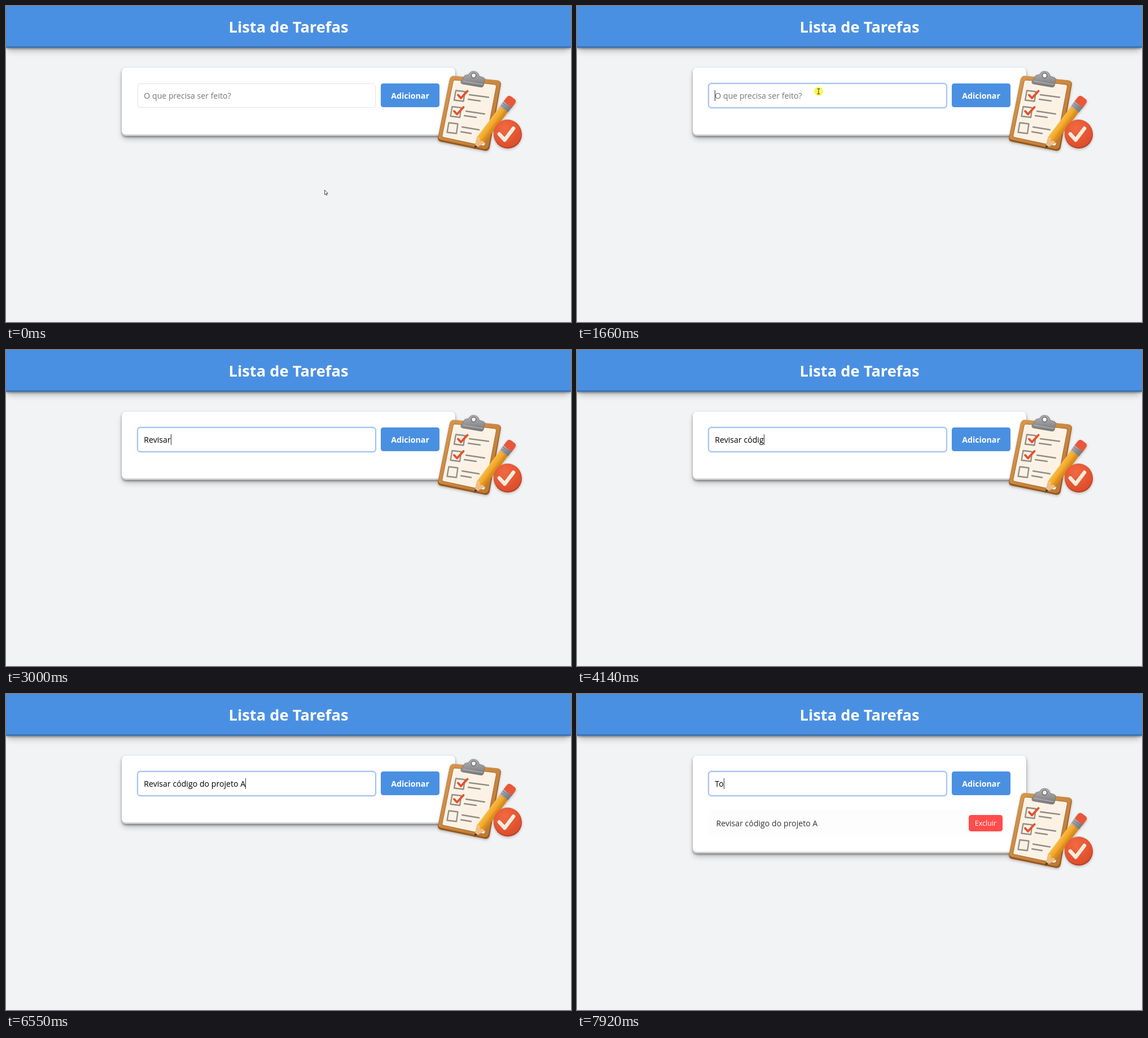
These frames come from a looping animation (1001x559 px, 7.99 s). An HTML page:

```html
<!DOCTYPE html>
<html lang="pt-BR">
<head>
<meta charset="utf-8">
<title>Lista de Tarefas</title>
<style>
html, body { margin: 0; width: 100%; height: 100%; overflow: hidden; background: #f1f3f5; }
body { position: relative; font: 14.15px "Open Sans", "Noto Sans", sans-serif; }
div, svg { position: absolute; box-sizing: border-box; white-space: pre; }
.raised {
  box-shadow: rgba(0,0,0,.4) 0 1.8px 3.6px, rgba(0,0,0,.3) 0 6.3px 11.7px -2.7px,
    rgba(0,0,0,.2) 0 -2.7px 0 inset;
}
#header {
  left: 0; top: 0; width: 1001px; height: 74px; background: #4a90e2; color: #fff;
  font-size: 27.3px; font-weight: 700; line-height: 73px; text-align: center;
}
#card { left: 205px; top: 109px; width: 591px; height: 121px; border-radius: 7px; background: #fff; }
#field {
  left: 233px; top: 136.5px; width: 422px; height: 43px; border: 1px solid #dee2e6;
  border-radius: 5px; padding-left: 10.3px; line-height: 42px; background: #fff;
}
#field.focus { border-color: #8ab6ef; box-shadow: 0 0 0 1.4px rgba(74,144,226,.38); }
#hint { left: 10.3px; top: 0; color: #757575; }
#caret { display: inline-block; width: 1px; height: 19px; background: #333; vertical-align: -4px; }
.button { color: #fff; text-align: center; border-radius: 4.5px; }
#add { left: 664px; top: 137px; width: 104px; height: 42px; background: #4a90e2; font-weight: 700; line-height: 43px; }
#row {
  left: 233px; top: 204px; width: 535px; height: 49px; padding-left: 13.5px;
  border-radius: 5px; background: #fdfdfd; color: #333; line-height: 49px;
}
#del { left: 461px; top: 10px; width: 60px; height: 28.5px; background: #ff4d4d; font-size: 12.5px; line-height: 29px; }
#art, #mouse { left: 0; top: 0; width: 1001px; height: 559px; }
#board { filter: drop-shadow(0 2px 2px rgba(60,40,20,.28)); }
</style>
</head>
<body>
<div id="header" class="raised">Lista de Tarefas</div>
<div id="card" class="raised"></div>
<div id="field"><div id="hint">O que precisa ser feito?</div><span id="typed"></span><span id="caret"></span></div>
<div id="add" class="button">Adicionar</div>
<div id="row">Revisar código do projeto A<div id="del" class="button">Excluir</div></div>

<svg id="art" viewBox="0 0 1001 559" fill="none" stroke-linecap="round" stroke-linejoin="round">
  <defs>
    <linearGradient id="wood" x2="1" y2="1"><stop stop-color="#d99a50"/><stop offset="1" stop-color="#bd7530"/></linearGradient>
    <linearGradient id="steel" x2="0" y2="1"><stop stop-color="#b4b4b5"/><stop offset="1" stop-color="#77777a"/></linearGradient>
    <linearGradient id="paint" x2="0" y2="1"><stop stop-color="#f9bd45"/><stop offset=".45" stop-color="#f2a82b"/><stop offset="1" stop-color="#cf8118"/></linearGradient>
    <radialGradient id="red" cx=".4" cy=".3" r=".75"><stop stop-color="#f06a42"/><stop offset="1" stop-color="#dc4b2a"/></radialGradient>
  </defs>
  <g id="board">
    <path d="M794 124L871 132Q878 133 876.500 140L857 250Q855 257.500 848 256L770 240Q764 238 765.500 232L786 130Q788 123 794 124Z" fill="#97581f"/>
    <path d="M794 123.500L871 131.500Q877 132.500 875.500 139L855 248Q853 254 847 253L770 236.500Q765 235 766.500 230L786.500 129Q788.500 123 794 123.500Z" fill="url(#wood)"/>
    <path d="M797 131L866 139Q869 139.500 868.500 143L849 244Q848 248 844 247L776 232.500Q772 231.500 773 228L792 134Q793 130.500 797 131Z" fill="#fbf2e5" stroke="#a86c33"/>
    <path d="M811 126Q812 122 817 122L820 121A9.500 9.500 0 0 1 838 124L844 126Q849 127 848 131L846 141Q845 144 841 143.500L809 138Q805 137 806 134Z" fill="url(#steel)" stroke="#707073" stroke-width=".8"/>
    <circle cx="828.500" cy="123" r="4.200" fill="#f5f5f5" stroke="#68686b" stroke-width="1.500"/>
    <path d="M810 133L844 139" stroke="#c0c0c1" stroke-width="1.200"/>
    <g stroke="#928c86" stroke-width="2.300">
      <path id="box" d="M797 149.500L813 151.500L810.500 168.500L794 166.500Z"/>
      <use href="#box" x="-6.500" y="28.500"/>
      <use href="#box" x="-12.500" y="57"/>
      <path d="M821 157L855 161.500M819 165L840 168M815 186L848 191M812 194L833 197M808 214L838 219M806 222.500L824 225.500"/>
    </g>
    <g stroke="#e5512d" stroke-width="4">
      <path id="tick" d="M801 157.500L806 163L817.500 150.500"/>
      <use href="#tick" x="-7" y="28.500"/>
    </g>
    <g transform="translate(829 253) rotate(-52.900)">
      <path d="M0 0L20 -8.500L20 8.500Z" fill="#edbd82"/>
      <path d="M0 0L7 -3L7 3Z" fill="#4b4038"/>
      <path d="M19 -8.500H90V8.500H19L21 4L18 0L21 -4Z" fill="url(#paint)"/>
      <path d="M21 3.500H90" stroke="#d98d1c"/>
      <path d="M97 -9H108Q114 -9 114 -3V4Q114 9.500 108 9.500H97Z" fill="#e9573a"/>
      <path d="M88 -9H99V9H88Z" fill="url(#steel)"/>
      <path d="M91.500 -8V8M95.500 -8V8" stroke="#77777a"/>
    </g>
    <circle cx="889" cy="227" r="25" fill="#b33b20"/>
    <circle cx="888.500" cy="225.500" r="24.700" fill="url(#red)"/>
    <path d="M874 226.500L883.500 237L899 216.500" stroke="#fcecdd" stroke-width="6.500"/>
  </g>
</svg>

<svg id="mouse" viewBox="0 0 1001 559" fill="none">
  <circle id="glow" r="8" fill="#fbf65a"/>
  <path id="arrow" d="M.5 .5V8.700L2.400 7L3.700 9.800L5 9.200L3.700 6.500H6.300Z" fill="#fff" stroke="#3a3a3a" stroke-width=".9"/>
  <path id="beam" d="M-2.500 -4.500H2.500M0 -4.500V4.500M-2.500 4.500H2.500" stroke="#333"/>
</svg>

<script>
const LOOP = 7990, FOCUS = 1660, ADDED = 6870;
const task = "Revisar código do projeto A";
const keys = [2080, 2260, 2460, 2600, 2730, 2870, 3000, 3220, 3400, 3680, 3810, 3940, 4140, 4240,
  4340, 4540, 4680, 4800, 5000, 5150, 5260, 5540, 5740, 5870, 5990, 6120, 6550];
const nextKeys = [7790, 7920];
const $ = id => document.getElementById(id);
const show = (id, on) => $(id).style.display = on ? "" : "none";
const type = (text, times, t) => text.slice(0, times.filter(k => k <= t).length);

function draw(t) {
  const added = t >= ADDED, focus = t >= FOCUS;
  const text = added ? type("To", nextKeys, t) : type(task, keys, t);
  $("typed").textContent = text;
  show("hint", !text);
  show("caret", focus && !(t >= 7410 && t < 7790));
  $("field").className = focus ? "focus" : "";

  show("row", added);
  $("card").style.height = (added ? 172.5 : 121) + "px";
  $("board").setAttribute("transform", `translate(0 ${added ? 51.5 : 0})`);

  // the pointer is sampled every 62 ms on its way to the field
  const step = Math.max(0, Math.min(6, Math.floor((t - 1150) / 62) + 1)) / 6;
  const p = step * step * (3 - 2 * step);
  const x = 564 - 136 * p, y = 325 - 174 * p;
  const inField = y < 179;
  show("mouse", t < keys[0]);
  show("arrow", !inField);
  show("beam", inField);
  show("glow", focus && t < 1930);
  for (const id of ["arrow", "beam", "glow"])
    $(id).setAttribute("transform", `translate(${x} ${y})`);
}

const start = performance.now();
function tick() {
  draw((performance.now() - start) % LOOP);
  requestAnimationFrame(tick);
}
draw(0);
requestAnimationFrame(tick);
</script>
</body>
</html>
```
